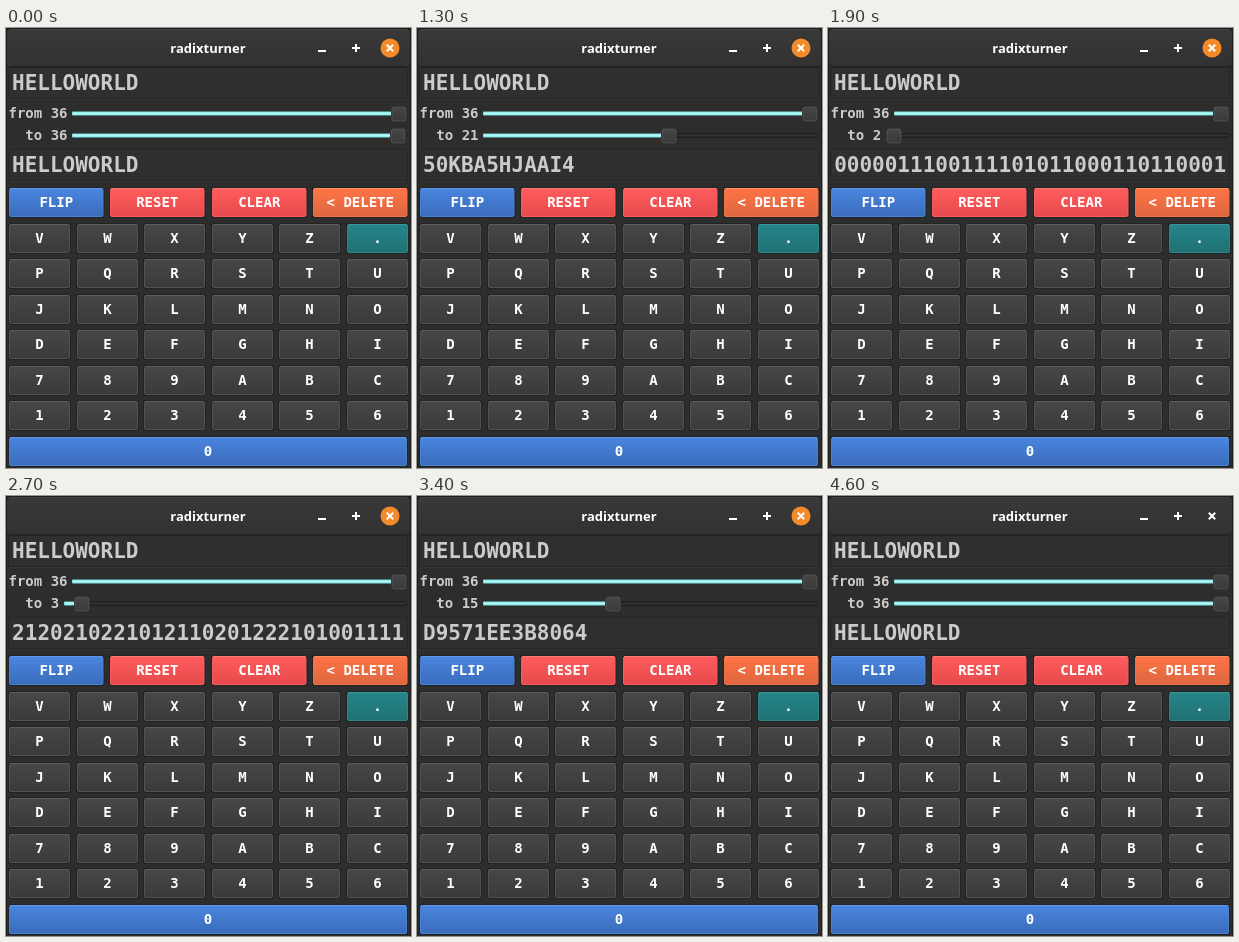
Write an HTML page that moves like this. It is 405 px wide and 440 px high and loops after 4.7 s.

```html
<!DOCTYPE html>
<html lang="en">
<head>
<meta charset="utf-8">
<title>Base calculator</title>
<style>
html, body { margin: 0; width: 100%; height: 100%; overflow: hidden; background: #2d2d2d; }
svg { display: block; width: 405px; height: 440px; }
text { font-family: "DejaVu Sans Mono", monospace; font-weight: 700; white-space: pre; }
.title { font: 700 13px "Noto Sans", sans-serif; font-stretch: semi-condensed; fill: #fff; text-anchor: middle; }
.entry { font-size: 21px; fill: #cbcbcb; }
.label { font-size: 14px; fill: #cbcbcb; }
.key { font-size: 14px; fill: #fff; text-anchor: middle; }
</style>
</head>
<body>
<svg id="stage" viewBox="0 0 405 440">
  <defs id="defs">
    <clipPath id="field"><rect x="5" y="122" width="394" height="32"/></clipPath>
  </defs>
</svg>
<script>
const NS = "http://www.w3.org/2000/svg";
const stage = document.getElementById("stage");
const defs = document.getElementById("defs");
const LOOP = 4700;
const INPUT = "HELLOWORLD";
const NUMBER = parseInt(INPUT, 36);
const DIGIT = 21 * 0.602;

function add(tag, attrs, parent = stage, content = "") {
  const el = document.createElementNS(NS, tag);
  for (const name in attrs) el.setAttribute(name, attrs[name]);
  el.textContent = content;
  parent.appendChild(el);
  return el;
}

const rect = (x, y, width, height, fill, extra = {}) =>
  add("rect", { x, y, width, height, fill, ...extra });
const label = (x, y, cls, content) => add("text", { x, y, class: cls }, stage, content);

function gradient(id, top, bottom) {
  const g = add("linearGradient", { id, x1: 0, y1: 0, x2: 0, y2: 1 }, defs);
  add("stop", { offset: 0, "stop-color": top }, g);
  add("stop", { offset: 1, "stop-color": bottom }, g);
}

function drawWindow() {
  rect(0, 0, 405, 440, "#2d2d2d");
  rect(0, 0, 405, 39, "#1d1d1d");
  rect(1, 1, 403, 38, "url(#bar)", { rx: 4 });
  rect(4, 1, 397, 1, "#424242");
  rect(0, 38, 405, 1, "#222");
  rect(0, 5, 1, 435, "#1f1f1f");
  rect(404, 5, 1, 435, "#1f1f1f");
  label(202, 25, "title", "radixturner");
  rect(312, 22, 8, 2, "#fff");
  rect(346, 19, 8, 2, "#fff");
  rect(349, 16, 2, 8, "#fff");
}

function drawEntry(y) {
  rect(2.5, y + 0.5, 399, 31, "#2f2f2f", { rx: 2, stroke: "#252525" });
  rect(3, y + 32, 398, 1, "#363636");
}

function button(x, y, w, kind, content) {
  const [edge, shine] = EDGES[kind];
  rect(x - 1, y - 1, w + 2, 31, "#232323", { rx: 2.5 });
  rect(x + 0.5, y + 0.5, w - 1, 28, `url(#${kind})`, { rx: 1.5, stroke: edge });
  rect(x + 1, y, w - 2, 1, shine);
  label(x + w / 2, y + 19, "key", content);
}

const EDGES = {
  gray: ["#525252", "#5d5d5d"],
  blue: ["#4b82d3", "#5f97e8"],
  red: ["#f65d5e", "#ff7778"],
  orange: ["#ee764b", "#ff8c62"],
  teal: ["#2f8688", "#3b9698"]
};

function drawButtons() {
  const rowY = i => Math.round(160 + 35.57 * i);
  const top = [["blue", "FLIP"], ["red", "RESET"], ["red", "CLEAR"], ["orange", "< DELETE"]];
  top.forEach(([kind, name], i) => button(Math.round(3 + 101.35 * i), rowY(0), 94.5, kind, name));
  ["VWXYZ.", "PQRSTU", "JKLMNO", "DEFGHI", "789ABC", "123456"].forEach((row, r) => {
    [...row].forEach((key, c) =>
      button(Math.round(3 + 67.55 * c), rowY(r + 1), 61, key === "." ? "teal" : "gray", key));
  });
  button(3, rowY(7), 398, "blue", "0");
}

function makeSlider(y, name) {
  const text = label(2.5, y + 4.5, "label", "");
  const trough = rect(0, y - 2, 0, 4, "#292929", { rx: 1.5, stroke: "#202020", "stroke-width": 1 });
  const groove = rect(0, y - 0.5, 0, 1, "#343434");
  const glow = rect(0, y - 2, 0, 4, "#83e4e4", { rx: 1 });
  const core = rect(0, y - 1, 0, 2, "#b0fafa");
  const knob = rect(0, y - 7, 15, 15, "url(#knob)", { rx: 2, stroke: "#1f1f1f" });
  const rim = rect(0, y - 6.5, 14, 14, "none", { rx: 1.5, stroke: "#555" });
  return value => {
    const shown = String(Math.round(value));
    const left = shown.length > 1 ? 66 : 58;
    const mid = left + 8 + (385 - left) * (value - 2) / 34;
    const span = (el, x, w) => {
      el.setAttribute("x", x);
      el.setAttribute("width", w);
    };
    text.textContent = name.padStart(4) + " " + shown;
    span(trough, left + 0.5, 400 - left);
    span(groove, left + 1, 399 - left);
    span(glow, left, mid - left);
    span(core, left + 1, mid - left - 1);
    knob.setAttribute("x", Math.round(mid) - 7.5);
    rim.setAttribute("x", Math.round(mid) - 7);
  };
}

// Slider position: a slow start, a drag down to 2, a pause, and a drag back up.
function baseAt(ms) {
  const t = Math.floor(ms / 100);
  if (t < 4) return 35.9;
  if (t < 9) return 35;
  if (t < 27) return Math.max(2, Math.round(34 - 3.25 * (t - 9)));
  if (t < 31) return 3;
  return Math.min(36, Math.round(15 + 3.2 * (t - 34)));
}

gradient("bar", "#393939", "#313131");
gradient("gray", "#474747", "#3a3a3a");
gradient("blue", "#4a85df", "#3a6cba");
gradient("red", "#ff5c5d", "#e64a4c");
gradient("orange", "#ff7446", "#dd663f");
gradient("teal", "#25868a", "#207073");
gradient("knob", "#464646", "#393939");

drawWindow();
const disc = add("circle", { cx: 384, cy: 20, r: 9.5, fill: "#f38b2b" });
add("path", { d: "M380.8 16.8l6.4 6.4m0-6.4l-6.4 6.4", stroke: "#fff", "stroke-width": 2 });
drawEntry(39);
drawEntry(121);
label(6, 62, "entry", INPUT);
const setFrom = makeSlider(85.5, "from");
const setTo = makeSlider(107.5, "to");
const fieldBox = add("g", { "clip-path": "url(#field)" });
const result = add("text", { x: 6, y: 144, class: "entry" }, fieldBox);
drawButtons();
setFrom(36);

function render(ms) {
  const value = baseAt(ms);
  const digits = NUMBER.toString(Math.round(value)).toUpperCase();
  setTo(value);
  // Long results stay scrolled to their end.
  result.setAttribute("x", Math.min(6, 398 - digits.length * DIGIT));
  result.textContent = digits;
  disc.setAttribute("visibility", ms < 4600 ? "visible" : "hidden");
}

const start = performance.now();
function tick() {
  render((performance.now() - start) % LOOP);
  requestAnimationFrame(tick);
}
tick();
</script>
</body>
</html>
```
